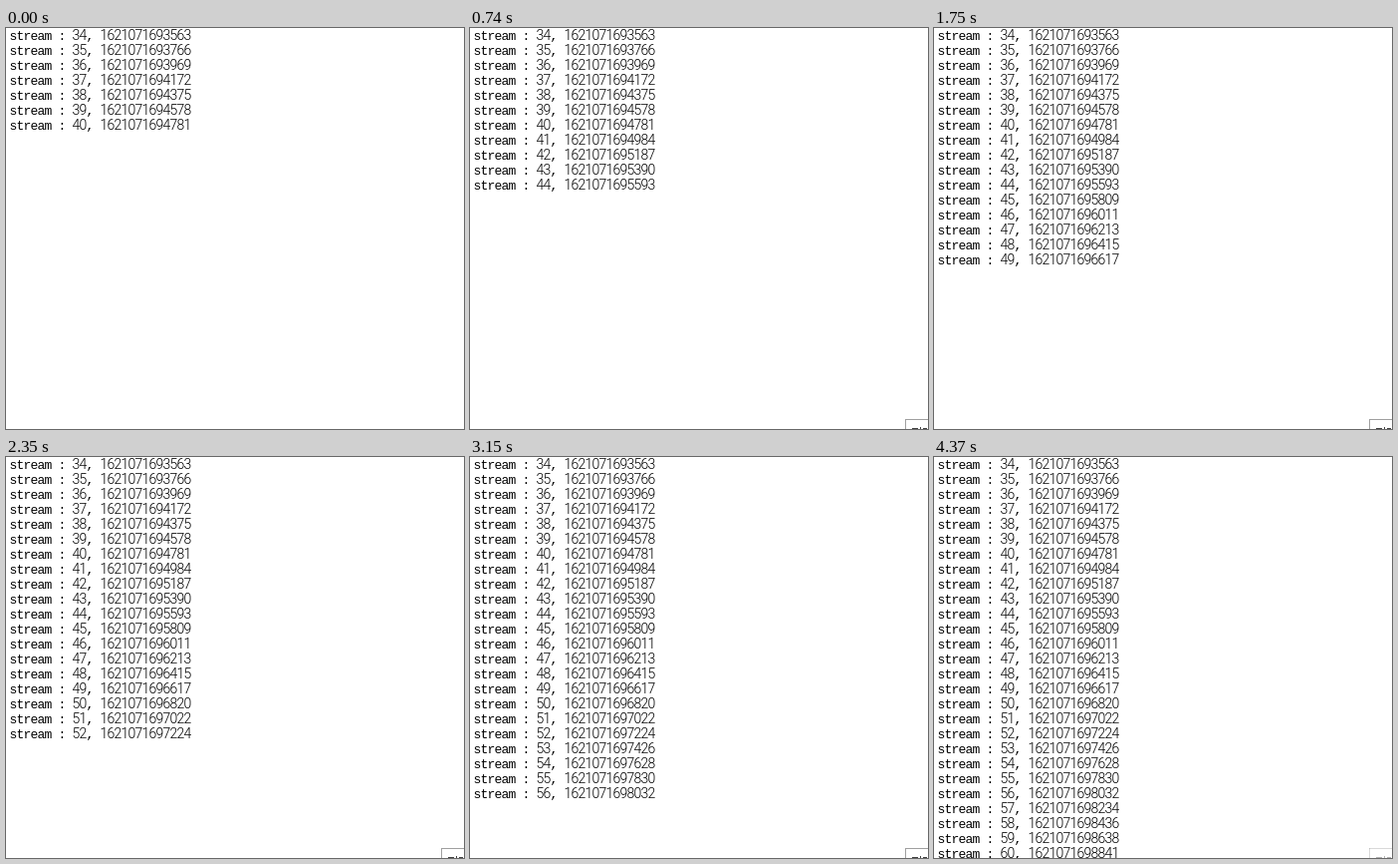
These frames come from a looping animation (460 px wide and 402 px high, 4.44 s). An HTML page with a canvas:

```html
<!DOCTYPE html>
<html lang="en">
<head>
<meta charset="utf-8">
<title>Stream log</title>
<style>
  html, body { margin: 0; width: 100%; height: 100%; overflow: hidden; background: #fff; }
  canvas { display: block; }
</style>
</head>
<body>
<canvas id="stage" width="460" height="402"></canvas>
<script>
const LOOP = 4440;
const FIRST_ID = 34;
const ROWS = 27;
const ROWS_AT_START = 7;
const SLOW_ROW = 11;
const CELL = 7;
const LINE = 15;
const DIGIT_FONT = '300 condensed 14px Roboto, sans-serif';
const LETTER_FONT = '13px "Liberation Mono", monospace';

const ctx = document.getElementById('stage').getContext('2d');
ctx.textAlign = 'center';

const clamp = (value, low, high) => Math.min(high, Math.max(low, value));

// The stream ticks evenly, apart from one slow tick that resets its pace.
function timestamp(row) {
  return row < SLOW_ROW
    ? 1621071693563 + 203 * row
    : 1621071695809 + Math.round(202.1 * (row - SLOW_ROW));
}

// Rows show up every 200 ms; those after the slow tick lag up to 80 ms behind.
function arrival(row) {
  if (row < ROWS_AT_START) return 0;
  return 70 + 200 * (row - ROWS_AT_START) + clamp(60 * (row - SLOW_ROW), 0, 80);
}

// The tooltip fades in hard steps of 70 ms.
function tooltipOpacity(t) {
  const stepsSince = start => Math.max(0, Math.floor((t - start) / 70) + 1);
  return clamp(stepsSince(600) / 3, 0, 1) - 0.3 * stepsSince(4300);
}

function drawRow(row) {
  const text = `stream : ${FIRST_ID + row}, ${timestamp(row)}`;
  ctx.fillStyle = '#000';
  [...text].forEach((char, column) => {
    ctx.font = /\d/.test(char) ? DIGIT_FONT : LETTER_FONT;
    ctx.fillText(char, 7.5 + column * CELL, 12 + row * LINE);
  });
}

function drawTooltip(opacity) {
  ctx.globalAlpha = opacity;
  ctx.fillStyle = '#a0a0a0';
  ctx.fillRect(437, 392, 23, 1);
  ctx.fillRect(437, 392, 1, 10);
  // Only the tops of the letters reach into view.
  ctx.fillStyle = '#444';
  ctx.fillRect(444, 401, 6, 1);
  ctx.fillRect(452, 400, 1, 2);
  ctx.fillRect(455, 401, 4, 1);
  ctx.globalAlpha = 1;
}

function draw(t) {
  ctx.fillStyle = '#fff';
  ctx.fillRect(0, 0, 460, 402);
  for (let row = 0; row < ROWS && arrival(row) <= t; row++) drawRow(row);
  drawTooltip(tooltipOpacity(t));
}

const start = performance.now();
function tick() {
  draw((performance.now() - start) % LOOP);
  requestAnimationFrame(tick);
}
tick();
</script>
</body>
</html>
```
